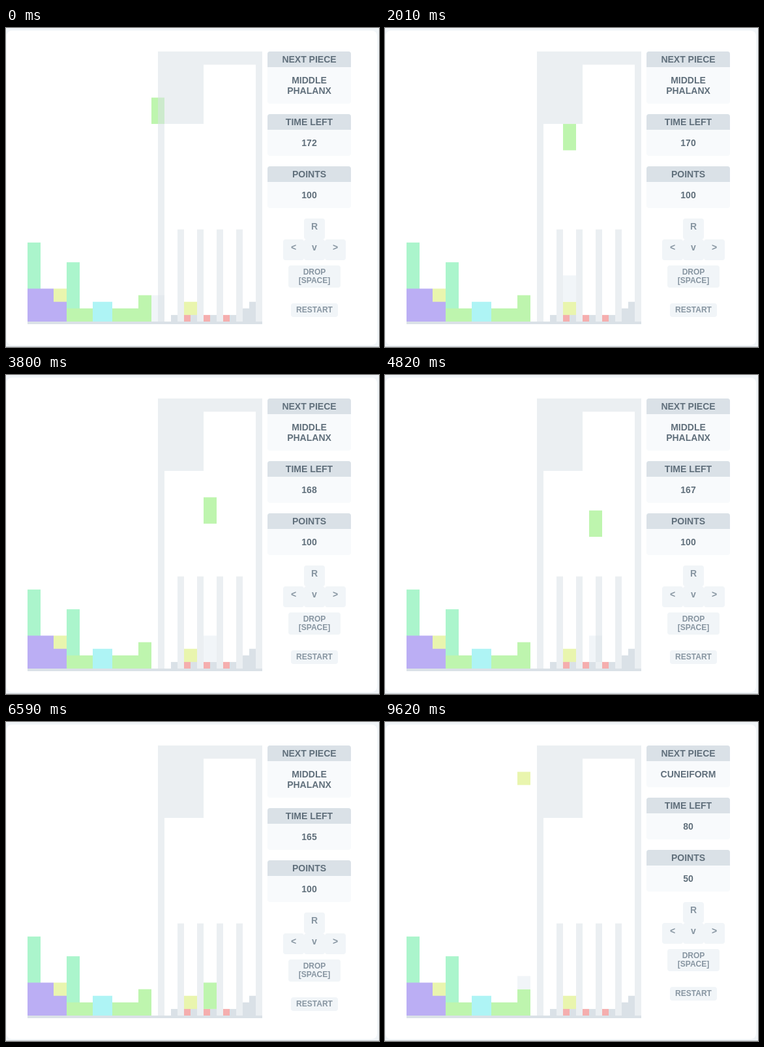
These frames come from a looping animation (572x489 px, 9790 ms). An HTML page:

```html
<!DOCTYPE html>
<html lang="en">
<head>
<meta charset="utf-8">
<title>Falling bones</title>
<style>
  html, body { margin: 0; width: 100%; height: 100%; overflow: hidden; }
  body {
    position: relative; background: #f1f5f8; color: #606f7b;
    font: bold 14px/16px "Liberation Sans", Arial, sans-serif; text-align: center;
  }
  .card {
    position: absolute; left: 1px; top: 4px; width: 568px; height: 482px;
    border-radius: 8px; background: #fff;
  }
  .edge { position: absolute; left: 0; top: 488px; width: 572px; height: 1px; background: #c4c9cd; }
  .board { position: absolute; left: 33px; top: 36px; width: 360px; height: 414px; overflow: hidden; }
  .floor { position: absolute; left: 33px; top: 450px; width: 360px; height: 4px; background: #dae1e7; }
  .side { position: absolute; left: 401px; top: 36px; width: 128px; }
  .panel { margin-bottom: 16px; border-radius: 4px; overflow: hidden; background: #f8fafc; }
  .panel b { display: block; padding: 4px 0; background: #dae1e7; }
  .panel div { padding: 12px; }
  .keys { width: 96px; margin-left: 24px; color: #8795a1; }
  .row { display: flex; }
  .key, .wide { box-sizing: border-box; margin: 0 auto; padding: 4px 0; border-radius: 4px; background: #f1f5f8; }
  .key { width: 32px; height: 32px; }
  .wide { font-size: 12px; line-height: 13px; }
  .drop { width: 80px; margin-top: 8px; }
  .restart { width: 72px; margin-top: 24px; }
</style>
</head>
<body>
<div class="card"></div>
<div class="edge"></div>
<svg class="board" viewBox="0 0 36 41" preserveAspectRatio="none">
  <g id="blocks"></g>
  <rect id="ghost" width="2" fill="#f1f5f8"/>
  <rect id="piece" width="2"/>
  <path fill="#dae1e7" fill-opacity=".53" d="M20 0h16v41h-1V2h-8v9h-6v30h-1z
    M23 27h1v14h-1z M26 27h1v14h-1z M29 27h1v14h-1z M32 27h1v14h-1z"/>
</svg>
<div class="floor"></div>
<div class="side">
  <div class="panel"><b>NEXT PIECE</b><div id="next"></div></div>
  <div class="panel"><b>TIME LEFT</b><div id="time"></div></div>
  <div class="panel"><b>POINTS</b><div id="points"></div></div>
  <div class="keys">
    <div class="key">R</div>
    <div class="row"><div class="key">&lt;</div><div class="key">v</div><div class="key">&gt;</div></div>
    <div class="wide drop">DROP<br>[SPACE]</div>
    <div class="wide restart">RESTART</div>
  </div>
</div>
<script>
  const LOOP = 9790, ROWS = 41, TICK = 502, RESET = 7070;
  const MINT = '#abf5cc', PURPLE = '#bbaef4', YELLOW = '#e9f5ae', CYAN = '#aef4f5',
        GREEN = '#bef5ae', RED = '#f5aeae', GREY = '#dae1e7';

  const $ = id => document.getElementById(id);
  const set = (el, attrs) => { for (const k in attrs) el.setAttribute(k, attrs[k]); };
  const write = (id, text) => { if ($(id).textContent !== String(text)) $(id).textContent = text; };

  // How many regular steps have happened since the first one
  const steps = (t, first, every, max = Infinity) =>
    Math.min(max, Math.max(0, Math.floor((t - first) / every) + 1));

  // Every block reaches the floor; later ones cover the foot of earlier ones
  const blocks = [];
  function block(x, y, width, fill) {
    blocks.push({ x, y, width });
    const rect = document.createElementNS('http://www.w3.org/2000/svg', 'rect');
    set(rect, { x, y, width, height: ROWS - y, fill });
    $('blocks').append(rect);
  }

  block(0, 29, 2, MINT);
  block(0, 36, 4, PURPLE);
  block(4, 36, 2, YELLOW);
  block(4, 38, 2, PURPLE);
  block(6, 32, 2, MINT);
  block(6, 39, 11, GREEN);
  block(10, 38, 3, CYAN);
  block(17, 37, 2, GREEN);
  block(24, 38, 2, YELLOW);
  for (let x = 22; x < 33; x += 3) {
    block(x, 40, 1, GREY);
    if (x < 31) block(x + 2, 40, 1, RED);
  }
  for (let i = 0; i < 2; i++) block(33 + i, 39 - i, 1, GREY);

  // Row where a two-column piece comes to rest
  function landing(col, height) {
    const tops = blocks.filter(b => b.x < col + 2 && b.x + b.width > col).map(b => b.y);
    return Math.min(ROWS, ...tops) - height;
  }

  // The clock loses half a second per tick and shows it rounded up
  const games = [
    { next: 'MIDDLE PHALANX', points: 100, color: GREEN, height: 4,
      row: 7, clock: 171.5, firstTick: 252, dropAt: 6590,
      // one tap right, a run of seven, then one right and one left
      column: t => 19 + (t >= 1140) + steps(t, 1427, 183, 7) + (t >= 4120) - (t >= 6130) },
    { next: 'CUNEIFORM', points: 50, color: YELLOW, height: 2,
      row: -1, clock: 82, firstTick: 7560, dropAt: Infinity,
      column: () => 17 }
  ];

  function draw(t) {
    const game = games[+(t >= RESET)];
    const { height } = game;
    const ticks = steps(t, game.firstTick, TICK);
    const x = game.column(t);
    const rest = landing(x, height);
    const y = t < game.dropAt ? game.row + ticks : rest;
    set($('piece'), { x, y, height, fill: game.color });
    set($('ghost'), { x, y: rest, height });
    write('next', game.next);
    write('time', Math.ceil(game.clock - ticks / 2));
    write('points', game.points);
  }

  const began = performance.now();
  function loop() {
    draw((performance.now() - began) % LOOP);
    requestAnimationFrame(loop);
  }
  loop();
</script>
</body>
</html>
```
